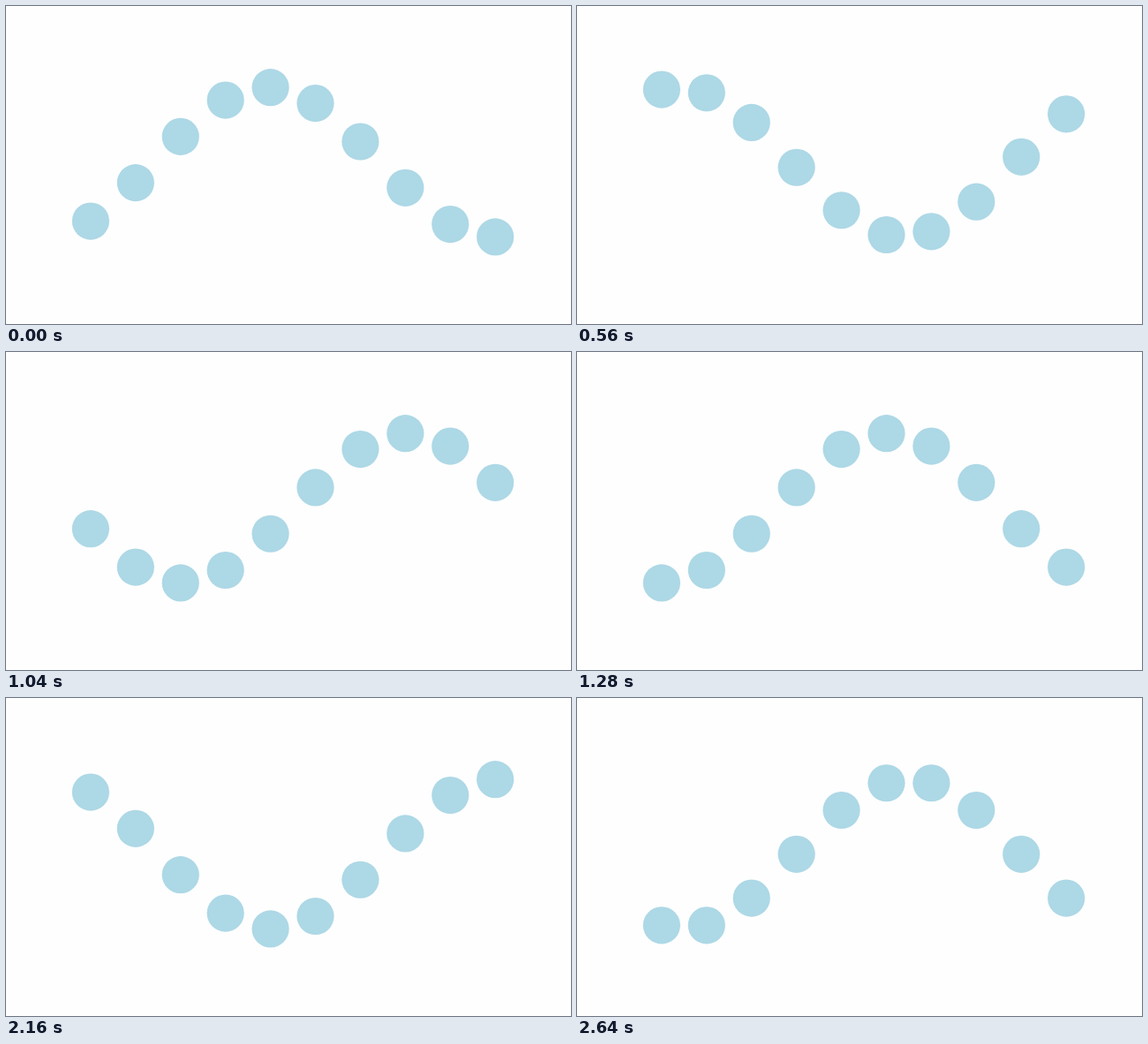
Animation of 640 by 360 pixels, one loop 2.72 s. Source, as an HTML page with a canvas:

```html
<!DOCTYPE html>
<html lang="en">
<head>
<meta charset="utf-8">
<title>Dot wave</title>
<style>
  html, body { margin: 0; width: 100%; height: 100%; overflow: hidden; background: #fefefe; }
  canvas { display: block; }
</style>
</head>
<body>
<canvas id="stage" width="640" height="360"></canvas>
<script>
const ctx = document.getElementById('stage').getContext('2d');

const LOOP = 2720, STEP = 80;
const DOTS = 10, RADIUS = 21.1;
const FIRST_X = 95.9, SPACING = 50.92;
const MID_Y = 176.8, AMPLITUDE = 84.7;
const TICKS_PER_CYCLE = 45;
const START_CREST = 3.944; // crest position, in dots

// [step, ticks]: the wave advances in whole ticks at a slightly uneven pace.
const PACE = [[0, 0], [7, 16], [13, 31], [16, 40], [22, 55], [27, 67], [33, 83]];

function ticksAt(step) {
  const next = Math.max(1, PACE.findIndex(([s]) => s >= step));
  const [s0, n0] = PACE[next - 1];
  const [s1, n1] = PACE[next];
  return Math.round(n0 + (n1 - n0) * (step - s0) / (s1 - s0));
}

function draw(time) {
  const step = Math.floor((time % LOOP) / STEP);
  const crest = START_CREST - ticksAt(step) * DOTS / TICKS_PER_CYCLE;

  ctx.fillStyle = '#fefefe';
  ctx.fillRect(0, 0, 640, 360);
  ctx.fillStyle = '#add8e6';
  for (let i = 0; i < DOTS; i++) {
    const y = MID_Y - AMPLITUDE * Math.cos((i - crest) * 2 * Math.PI / DOTS);
    ctx.beginPath();
    ctx.arc(FIRST_X + i * SPACING, y, RADIUS, 0, 2 * Math.PI);
    ctx.fill();
  }
}

const start = performance.now();
function tick() {
  draw(performance.now() - start);
  requestAnimationFrame(tick);
}
tick();
</script>
</body>
</html>
```
